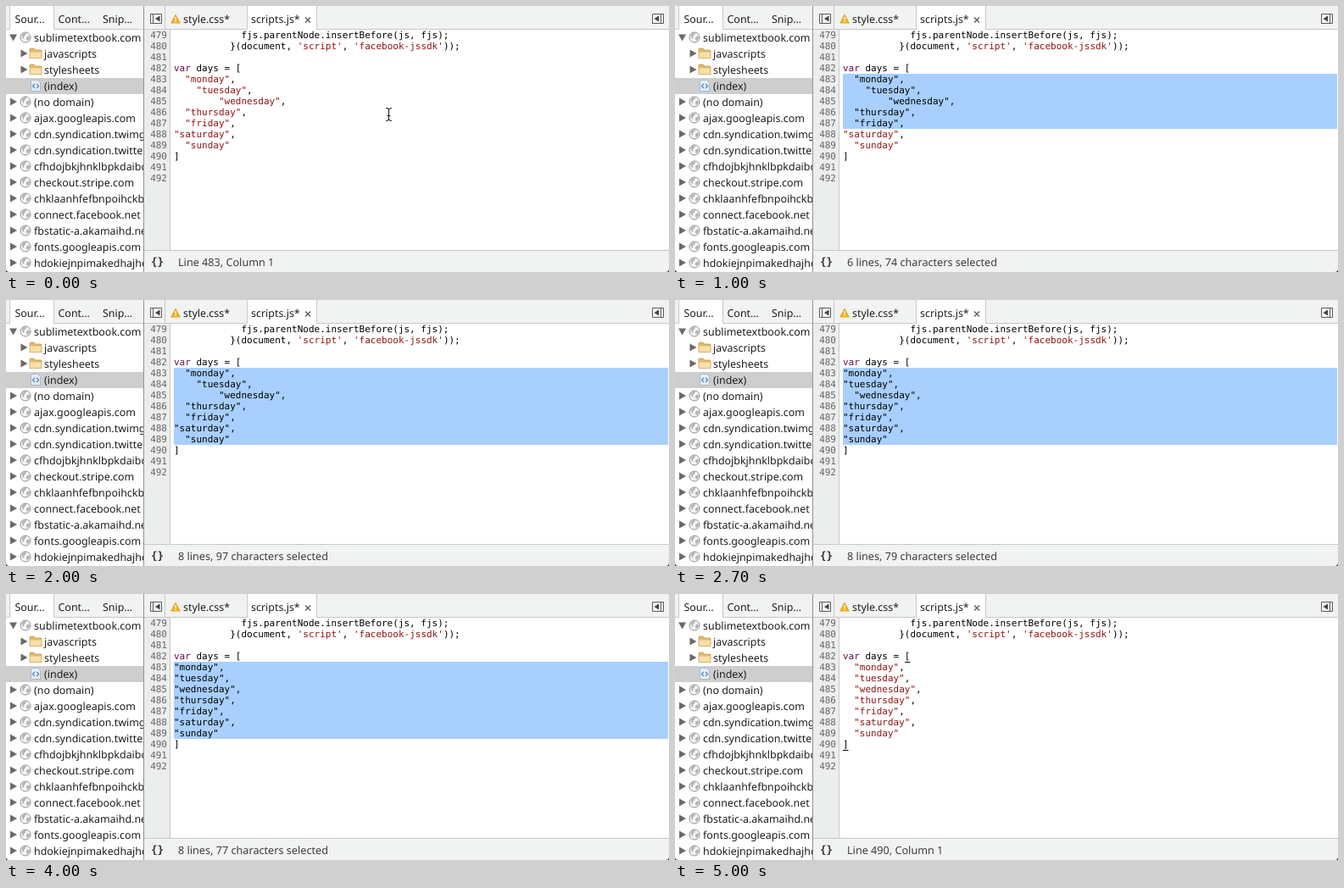
Recreate the animation shown at these times as an HTML page. Size 782 px wide and 314 px high, loop 5.1 s.

```html
<!DOCTYPE html>
<html lang="en">
<head>
<meta charset="utf-8">
<title>Re-indenting lines in the editor</title>
<style>
html, body { margin: 0; width: 100%; height: 100%; overflow: hidden; background: #fff; }
svg { display: block; width: 782px; height: 314px; }
text { white-space: pre; text-rendering: geometricPrecision; }
.ui { font: 12.45px "Noto Sans", sans-serif; fill: #1c1c1c; }
.ui.status { font-size: 12.65px; fill: #3c3c3c; }
.code { font: 11px "DejaVu Sans Mono", monospace; fill: #000; }
.num { fill: #666; text-anchor: end; }
.str { fill: #921515; }
.key { fill: #650f50; }
.picked .str { fill: #000; }
.edge { fill: none; stroke: #c6c8c7; }
</style>
</head>
<body>
<svg id="stage" viewBox="0 0 782 314" xmlns="http://www.w3.org/2000/svg">
  <defs>
    <clipPath id="side"><rect width="162" height="314"/></clipPath>
    <g id="globe">
      <circle r="6" fill="#f6f6f6" stroke="#8c8c8c"/>
      <path d="M-4.5-2.5C-3-5 0-5.500 1-4.500L0-2.500-2-1-1.500 1-3 2ZM1 0L4-2 5 1 3 4 1 3Z" fill="#b4b4b4"/>
    </g>
    <path id="right" d="M-3.500-4.500L4.500 0-3.500 4.500Z" fill="#6a6a6a"/>
    <g id="folder">
      <path d="M-7 5.500V-5Q-7-6-6-6H-2L-.500-4H6Q7-4 7-3V5.500Z" fill="#e2b96c" stroke="#c79a55" stroke-width=".8"/>
      <path d="M-6.500 5.200V-1.500H6.500V5.200Z" fill="#f8e0a8"/>
    </g>
    <g id="file">
      <path d="M-5.500-6.500H2.500L5.500-3.500V6.500H-5.500Z" fill="#e4edf6" stroke="#a9b9ca"/>
      <path d="M-1.200-2.200L-3.500 .5-1.200 3.200M1.200-2.200L3.500 .5 1.200 3.200" fill="none" stroke="#4f86bd" stroke-width="1.3"/>
    </g>
  </defs>

  <rect width="782" height="314" fill="#fff"/>
  <rect width="782" height="28" fill="#f1f3f2"/>

  <g id="tree" clip-path="url(#side)">
    <rect x="4" width="53" height="28" fill="#fff"/>
    <path class="edge" d="M4.500 0V27.500H0M56.500 0V27.500H162"/>
    <rect y="85" width="162" height="19" fill="#cecece"/>
  </g>

  <rect x="163" y="28" width="30" height="261" fill="#eceeed"/>
  <path class="edge" d="M193.500 28V289"/>
  <rect id="band" x="198" y="80" width="583" height="0" fill="#a8cffe"/>
  <g id="text"></g>
  <rect id="caret" x="198" width="1" height="13" fill="#000"/>
  <path id="marks" d="M271 80.500H277.500M198 184.500H204.500" stroke="#000"/>
  <path id="beam" d="M448 120.500Q451.500 120.500 451.500 123V133Q451.500 135.500 448 135.500M455 120.500Q451.500 120.500 451.500 123M451.500 133Q451.500 135.500 455 135.500M449.500 129.500H453.500" fill="none" stroke="#222" stroke-width="1.1"/>

  <path class="edge" d="M163 27.500H782"/>
  <rect x="285" width="82" height="28" fill="#fff"/>
  <path class="edge" d="M284.500 0V28M366.500 0V28M187.500 0V27"/>
  <path d="M170.500 9.500H183.500V20.500H170.500ZM173.500 9.500V20.500M762.500 9.500H775.500V20.500H762.500ZM772.500 9.500V20.500" fill="none" stroke="#5a5a5a"/>
  <path d="M181.500 11.500V18.500L176 15ZM770 11.500V18.500L764.500 15Z" fill="#444"/>
  <path d="M200 10.500L205 20H195Z" fill="#f3b51e" stroke="#e5a41c" stroke-width="1.200" stroke-linejoin="round"/>
  <path d="M200 13V16.500M200 17.500V19" stroke="#fff" stroke-width="1.300"/>
  <text class="ui" x="209" y="20">style.css*</text>
  <text class="ui" x="289" y="20">scripts.js*</text>
  <path d="M353 13.500L359 19.500M359 13.500L353 19.500" stroke="#5c5c5c" stroke-width="1.400"/>

  <rect x="163" y="289" width="619" height="25" fill="#f1f3f2"/>
  <path class="edge" d="M163 288.500H782"/>
  <text x="171" y="306" style="font:bold 12.500px 'DejaVu Sans Mono',monospace" fill="#333">{}</text>
  <text id="status" class="ui status" x="203" y="307"></text>
  <path d="M162.500 0V314" stroke="#919191"/>
  <path d="M0 310Q0 314 4 314H0ZM782 310Q782 314 778 314H782Z" fill="#333"/>
</svg>
<script>
const LOOP = 5100, CHAR = 6.62, LEFT = 198, ROW = 13, FIRST = 479;
const el = id => document.getElementById(id);

function add(parent, tag, attrs, body) {
  const node = document.createElementNS("http://www.w3.org/2000/svg", tag);
  for (const k in attrs) node.setAttribute(k, attrs[k]);
  if (body) node.innerHTML = body;
  parent.appendChild(node);
  return node;
}

const tree = el("tree");
["Sour…", "Cont…", "Snip…"].forEach((s, i) =>
  add(tree, "text", { class: "ui", x: [10.5, 61.5, 114][i], y: 20 }, s));

const sites = ["sublimetextbook.com", "javascripts", "stylesheets", "(index)", "(no domain)",
  "ajax.googleapis.com", "cdn.syndication.twimg.com", "cdn.syndication.twitter.com",
  "cfhdojbkjhnklbpkdaibc", "checkout.stripe.com", "chklaanhfefbnpoihckb",
  "connect.facebook.net", "fbstatic-a.akamaihd.net", "fonts.googleapis.com", "hdokiejnpimakedhajhd"];
sites.forEach((name, i) => {
  const y = 37 + i * 19, child = i > 0 && i < 4;
  if (i !== 3) add(tree, "use", {
    href: "#right",
    transform: `translate(${child ? 21 : 8.5} ${y}) rotate(${i ? 0 : 90})`
  });
  const icon = !child ? "globe" : i === 3 ? "file" : "folder";
  add(tree, "use", { href: "#" + icon, x: child ? 35 : 23, y });
  add(tree, "text", { class: "ui", x: child ? 45 : 33, y: y + 4.5 }, name);
});

const text = el("text");
const baseline = n => 38 + (n - FIRST) * ROW;
const str = s => `<tspan class="str">${s}</tspan>`;
const line = (n, indent, body) =>
  add(text, "text", { class: "code", x: LEFT + indent * CHAR, y: baseline(n) }, body);

for (let n = FIRST; n <= 492; n++)
  add(text, "text", { class: "code num", x: 190, y: baseline(n) }, String(n));

line(479, 12, "fjs.parentNode.insertBefore(js, fjs);");
line(480, 10, `}(document, ${str("'script'")}, ${str("'facebook-jssdk'")}));`);
line(482, 0, '<tspan class="key">var</tspan> days = [');
line(490, 0, "]");

const days = ["monday", "tuesday", "wednesday", "thursday", "friday", "saturday", "sunday"]
  .map((name, i) => {
    const comma = i < 6 ? "," : "";
    return {
      indent: [2, 4, 8, 2, 2, 0, 2][i],
      size: name.length + 3 + comma.length,
      node: line(483 + i, 0, str(`"${name}"`) + comma)
    };
  });

const PICK = 600, OUTDENT = 2300, INDENT = 4200, DROP = 4500;

function draw(t) {
  const done = t >= DROP;
  const picked = t < PICK || done ? 0 : Math.min(7, Math.floor((t - PICK) / 100) + 1);
  const outs = t < OUTDENT ? 0 : Math.min(4, Math.floor((t - OUTDENT) / 200) + 1);
  let chars = 0;
  days.forEach((d, i) => {
    const indent = Math.max(0, d.indent - 2 * outs) + (t >= INDENT ? 2 : 0);
    d.node.setAttribute("x", LEFT + indent * CHAR);
    d.node.setAttribute("class", i < picked ? "code picked" : "code");
    if (i < picked) chars += indent + d.size;
  });
  el("band").setAttribute("height", picked * ROW);
  el("status").textContent = picked
    ? `${picked + 1} lines, ${chars} characters selected`
    : `Line ${done ? 490 : 483}, Column 1`;

  const show = (id, on) => el(id).setAttribute("visibility", on ? "visible" : "hidden");
  el("caret").setAttribute("y", done ? 171 : 80);
  show("caret", done ? t < DROP + 500 : t >= 100 && t < PICK);
  show("marks", done);
  show("beam", t < PICK);
}

const start = performance.now();
function tick() {
  draw((performance.now() - start) % LOOP);
  requestAnimationFrame(tick);
}
draw(0);
requestAnimationFrame(tick);
</script>
</body>
</html>
```
